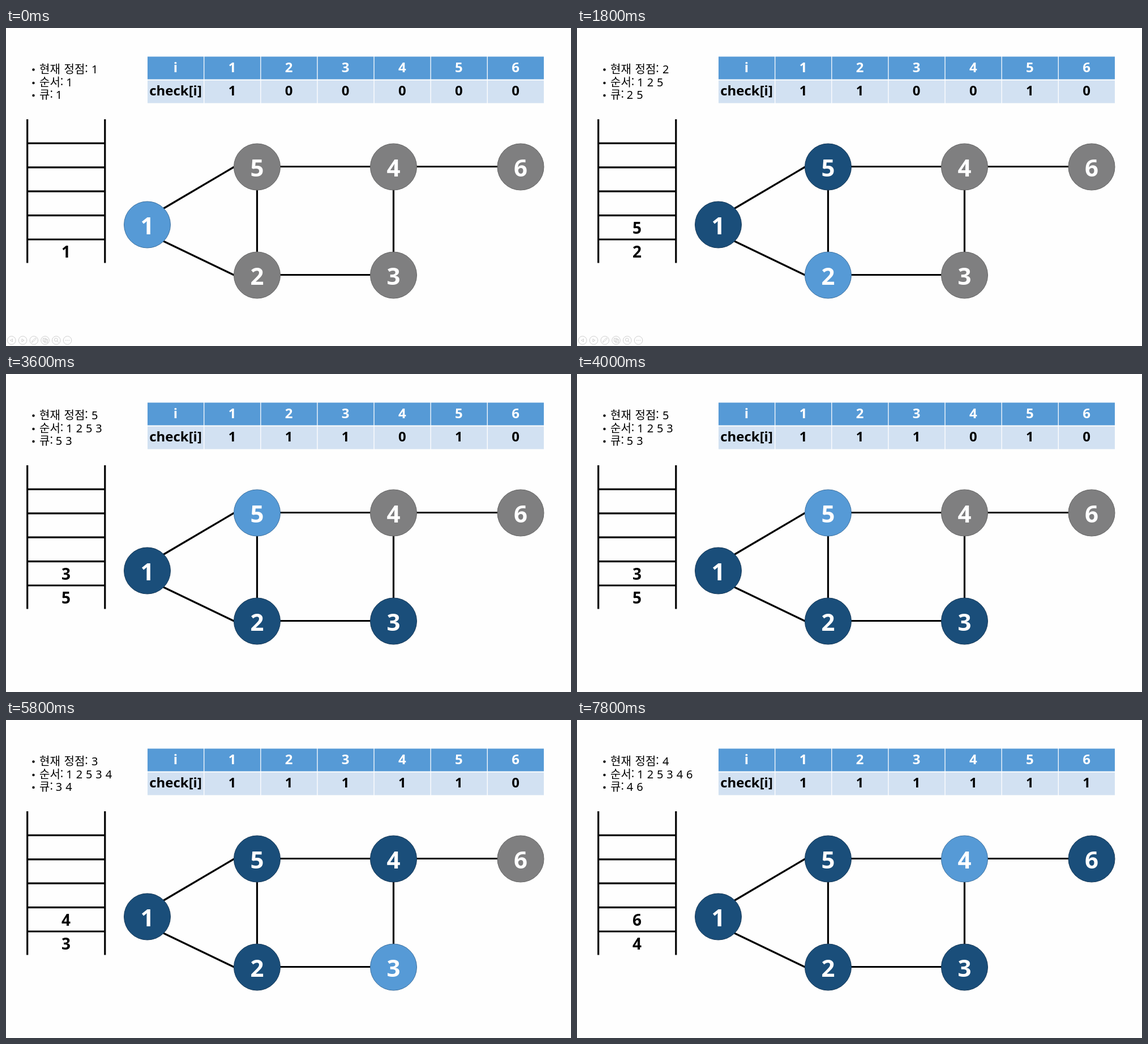
Animation, 998 px wide and 561 px high, one loop 8000 ms. Source, as an HTML page:

```html
<!DOCTYPE html>
<html lang="ko">
<head>
<meta charset="utf-8">
<title>BFS</title>
<style>
  html, body { margin: 0; width: 100%; height: 100%; overflow: hidden; background: #fefefe; }
  svg { display: block; }
  text { font-family: "Noto Sans", "Open Sans", sans-serif; }
  .bold { font-weight: 700; text-anchor: middle; }
  .note { font-size: 20px; font-family: "Noto Sans CJK KR", "Noto Sans CJK", sans-serif; }
  .nums { font-size: 20px; word-spacing: .7px; }
  .cell { font-size: 24px; }
  .line { stroke: #000; stroke-width: 3.2; fill: none; }
  .tool { stroke: #cfcfcf; fill: none; }
</style>
</head>
<body>
<svg id="stage" width="998" height="561" viewBox="0 0 998 561"></svg>
<script>
const LOOP = 8000, TOOLBAR_END = 2400;
const BLUE = '#569ad6', DARK = '#1a4e7a', GRAY = '#7f7f80';
const nodes = [[249.5, 347], [443.5, 436], [684.5, 436], [684.5, 245], [443.5, 245], [909, 245]];

// start time, visiting order, queue (its head is the current vertex)
const steps = [
  [0, '1', '1'],
  [600, '125', '125'],
  [1800, '125', '25'],
  [2600, '1253', '253'],
  [3600, '1253', '53'],
  [4600, '12534', '534'],
  [5800, '12534', '34'],
  [6600, '12534', '4'],
  [7600, '125346', '46']
];

const stage = document.getElementById('stage');

function add(tag, attrs, content = '', parent = stage) {
  const el = document.createElementNS('http://www.w3.org/2000/svg', tag);
  for (const key in attrs) el.setAttribute(key, attrs[key]);
  el.textContent = content;
  parent.appendChild(el);
  return el;
}
const label = (x, y, cls, content = '', fill = '#000') => add('text', { x, y, class: cls, fill }, content);
const path = (d, cls, parent) => add('path', { d, class: cls }, '', parent);
const spaced = s => [...s].join(' ');

// Notes
[73.5, 97, 119].forEach(cy => add('circle', { cx: 48.5, cy, r: 2.2 }));
label(59, 80, 'note', '현재');
label(102.5, 80, 'note', '정점:');
label(59, 103, 'note', '순서:');
label(59, 125, 'note', '큐:');
const current = label(151, 80, 'nums');
const order = label(106.3, 103, 'nums');
const queue = label(87.8, 125, 'nums');

// Table
add('rect', { x: 250, y: 50.5, width: 700, height: 40, fill: BLUE });
add('rect', { x: 250, y: 92.5, width: 700, height: 40, fill: '#d2e1f2' });
for (let x = 349.7; x < 900; x += 100.1) add('rect', { x: x - .6, y: 50, width: 1.3, height: 83, fill: '#fff' });
label(299.5, 78, 'bold cell', 'i', '#fff');
label(299.5, 119, 'bold cell', 'check[i]');
const checks = nodes.map((_, i) => {
  const x = 399.5 + 100.1 * i;
  label(x, 78, 'bold cell', i + 1, '#fff');
  return label(x, 119, 'bold cell');
});

// Queue column
path('M37.7 161V414.5M174.8 161V414.5', 'line');
const slots = [];
for (let i = 0; i < 5; i++) {
  path(`M37 ${373 - 42.4 * i}H175`, 'line');
  const slot = label(106, 405 - 42.4 * i, 'bold');
  slot.style.fontSize = '28px';
  slots.push(slot);
}

// Graph
path('M278 318.5L403 245M278 376L403 436M443.5 285V395M684.5 285V395M484 244.5H644M725 244.5H869M484 435.5H644', 'line');
const discs = nodes.map(([cx, cy], i) => {
  const disc = add('circle', { cx, cy, r: 41, 'stroke-width': 1 });
  label(cx, cy + 17, 'bold', i + 1, '#fff').style.fontSize = '42px';
  return disc;
});

// Slide show controls
const toolbar = add('g', {});
for (let i = 0; i < 6; i++) add('circle', { cx: 9.8 + 19.75 * i, cy: 551, r: 7.3, class: 'tool' }, '', toolbar);
path('M11.5 548.5L7.5 551L11.5 553.5ZM28 548.5L32 551L28 553.5Z', 'tool', toolbar);
path('M45.5 554.5L46.5 552L52 546.5L53.5 548L48 553.5Z', 'tool', toolbar);
path('M65.5 547.5H71V553H65.5ZM68 549.5H73.5V555H68Z', 'tool', toolbar);
path('M90 552L93 555M85.5 550A2.8 2.8 0 1 0 91.1 550A2.8 2.8 0 1 0 85.5 550', 'tool', toolbar);
path('M104.5 551h2M107.5 551h2M110.5 551h2', 'tool', toolbar);

let shown;
function show(step) {
  if (step === shown) return;
  shown = step;
  const [, seen, waiting] = step;
  current.textContent = waiting[0];
  order.textContent = spaced(seen);
  queue.textContent = spaced(waiting);
  slots.forEach((slot, i) => slot.textContent = waiting[i] || '');
  discs.forEach((disc, i) => {
    const id = String(i + 1), visited = seen.includes(id), active = id === waiting[0];
    checks[i].textContent = visited ? 1 : 0;
    disc.setAttribute('fill', active ? BLUE : visited ? DARK : GRAY);
    disc.setAttribute('stroke', active ? '#3f72a0' : visited ? '#173a59' : '#666');
  });
}

function frame() {
  const t = performance.now() % LOOP;
  show(steps.filter(s => s[0] <= t).pop());
  toolbar.style.display = t < TOOLBAR_END ? '' : 'none';
  requestAnimationFrame(frame);
}
frame();
</script>
</body>
</html>
```
